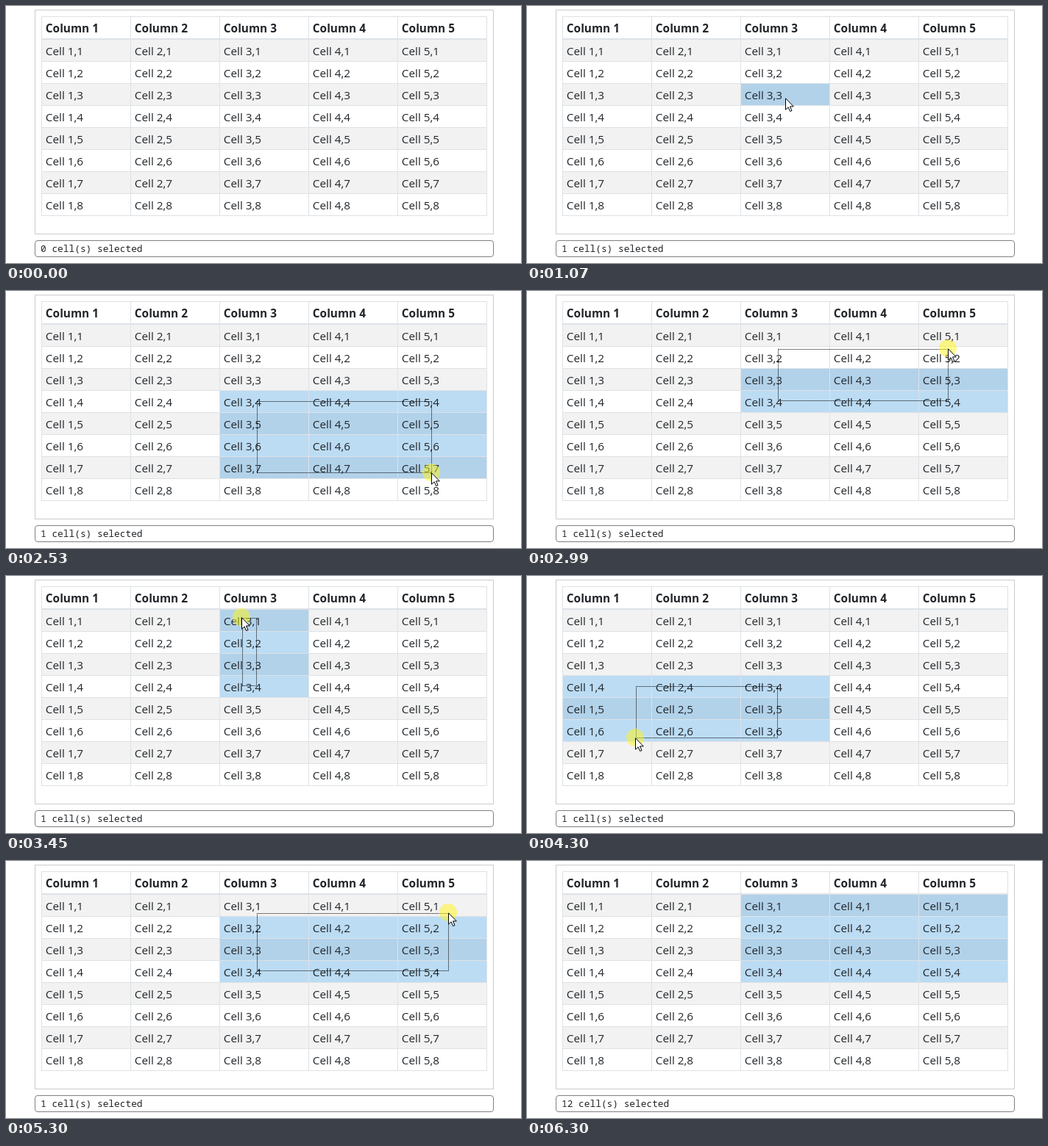
Write an HTML page that moves like this. It is 700 px wide and 350 px high and loops after 6610 ms.

```html
<!DOCTYPE html>
<html lang="en">
<head>
<meta charset="utf-8">
<title>Table cell selection</title>
<style>
  html, body { margin: 0; width: 100%; height: 100%; overflow: hidden; background: #fff; }
  svg { position: absolute; left: 0; top: 0; display: block; }
  text { font: 15.3px "Open Sans", sans-serif; fill: #212529; }
  .head { font-weight: 700; font-size: 15.4px; }
  #status { font: 12.83px "Noto Sans Mono", monospace; white-space: pre; }
  .grid { fill: #dee2e6; }
  .cell { fill: #fff; }
  .cell.odd { fill: #f2f2f2; }
  .cell.on { fill: #bcdcf4; }
  .cell.odd.on { fill: #b2d2ea; }
  #lasso { position: absolute; box-sizing: border-box; border: 1px dotted #000; }
</style>
</head>
<body>
<svg width="700" height="350" viewBox="0 0 700 350">
  <rect x="39.5" y="5.5" width="623" height="305" fill="none" stroke="#ccc"/>
  <rect x="39.5" y="319.5" width="623" height="22" rx="3.5" fill="#fff" stroke="#808080"/>
  <text id="status" x="47" y="335"></text>
  <g id="table"></g>
</svg>
<div id="lasso"></div>
<svg width="700" height="350" viewBox="0 0 700 350">
  <circle id="halo" r="12" fill="#fff614" fill-opacity=".5"/>
  <path id="arrow" d="M.5 .8V16.2L4.1 12.8L6.6 18.5L9 17.5L6.5 11.9H11.3Z" fill="#fff" stroke="#000"/>
</svg>
<script>
const LOOP = 6610, STEP = 76.96;
const COLS = 5, ROWS = 8, COL_W = 121, ROW_H = 30, LEFT = 48, TOP = 46;
const CLICK = 9, PRESS = 20, RELEASE = 75, GONE = 82;
const LAG = 1.1; // steps by which the highlight trails the pointer

// Turning points of the pointer; a repeated place is a rest
const REST = { x: 354, y: 122 }, ANCHOR = { x: 341, y: 150 }, END = { x: 602, y: 62 };
const KEYS = [
  { k: 1, x: 528, y: 304 },
  { k: 7, ...REST }, { k: 13, ...REST },
  { k: 17, ...ANCHOR }, { k: PRESS, ...ANCHOR },
  { k: 26, x: 360, y: 217 },
  { k: 34, x: 600, y: 240 },
  { k: 39, x: 573, y: 79 },
  { k: 45, x: 321, y: 57 },
  { k: 56, x: 148, y: 221 },
  { k: 61, x: 310, y: 264 },
  { k: 65, x: 582, y: 205 },
  { k: 69, x: 602, y: 71 },
  { k: 71, ...END }, { k: 77, ...END },
  { k: 81, x: 580, y: 331 }
];

const $ = id => document.getElementById(id);
const clamp = (v, lo, hi) => Math.min(hi, Math.max(lo, v));
const between = (v, a, b) => v >= Math.min(a, b) && v <= Math.max(a, b);
const show = (el, on) => { el.style.display = on ? "" : "none"; };

function add(tag, attrs, text = "") {
  const el = document.createElementNS("http://www.w3.org/2000/svg", tag);
  for (const name in attrs) el.setAttribute(name, attrs[name]);
  el.textContent = text;
  $("table").append(el);
  return el;
}

const cells = [];
function buildTable() {
  add("rect", { class: "grid", x: LEFT, y: 14, width: COLS * COL_W + 1, height: 272 });
  for (let c = 0; c < COLS; c++) {
    const x = LEFT + 1 + c * COL_W, tx = x + 4.8, width = COL_W - 1;
    add("rect", { class: "cell", x, y: 15, width, height: 29 });
    add("text", { class: "head", x: tx, y: 36 }, `Column ${c + 1}`);
    for (let r = 0; r < ROWS; r++) {
      const y = TOP + r * ROW_H;
      const el = add("rect", { class: r % 2 ? "cell" : "cell odd", x, y, width, height: ROW_H - 1 });
      cells.push({ el, c, r });
      add("text", { x: tx, y: y + 21 }, `Cell ${c + 1},${r + 1}`);
    }
  }
}

const samePlace = (a, b) => a.x === b.x && a.y === b.y;

// Catmull-Rom tangent, zero beside a rest
function tangent(i, axis) {
  const a = KEYS[Math.max(i - 1, 0)], b = KEYS[i], c = KEYS[Math.min(i + 1, KEYS.length - 1)];
  const resting = (a !== b && samePlace(a, b)) || (b !== c && samePlace(b, c));
  return resting ? 0 : (c[axis] - a[axis]) / (c.k - a.k);
}

function pointer(step) {
  const k = clamp(step, KEYS[0].k, KEYS[KEYS.length - 1].k);
  const i = Math.max(KEYS.findIndex(key => key.k >= k) - 1, 0);
  const p = KEYS[i], q = KEYS[i + 1], h = q.k - p.k;
  const u = (k - p.k) / h, v = 1 - u, ease = u * u * (3 - 2 * u);
  const at = axis => Math.round(p[axis] + (q[axis] - p[axis]) * ease
    + h * u * v * (v * tangent(i, axis) - u * tangent(i + 1, axis)));
  return { x: at("x"), y: at("y") };
}

const cellAt = ({ x, y }) => ({
  c: clamp(Math.floor((x - LEFT - .5) / COL_W), 0, COLS - 1),
  r: clamp(Math.floor((y - TOP + .5) / ROW_H), 0, ROWS - 1)
});

function select(step) {
  const dragged = step >= PRESS;
  const from = cellAt(dragged ? ANCHOR : REST);
  const to = dragged ? cellAt(pointer(clamp(step - LAG, PRESS, RELEASE))) : from;
  for (const { el, c, r } of cells)
    el.classList.toggle("on", step >= CLICK && between(c, from.c, to.c) && between(r, from.r, to.r));
}

function drawLasso({ x, y }) {
  Object.assign($("lasso").style, {
    left: Math.min(x, ANCHOR.x) + "px",
    top: Math.min(y, ANCHOR.y) + "px",
    width: Math.abs(x - ANCHOR.x) + "px",
    height: Math.abs(y - ANCHOR.y) + "px"
  });
}

function draw(step) {
  const tip = pointer(step), shift = `translate(${tip.x - 1} ${tip.y - 1})`;
  const dragging = step >= PRESS && step < RELEASE;
  select(step);
  drawLasso(tip);
  show($("lasso"), dragging);
  show($("halo"), dragging || step === CLICK);
  show($("arrow"), step > 0 && step < GONE);
  $("halo").setAttribute("transform", shift);
  $("arrow").setAttribute("transform", shift);
  const count = step <= CLICK ? 0 : step < RELEASE ? 1 : 12;
  $("status").textContent = `${count} cell(s) selected`;
}

let last = -1;
function tick() {
  const t = Math.floor(performance.now() % LOOP / 10) * 10; // delays come in whole 10 ms
  const step = clamp(Math.ceil((t - 60) / STEP), 0, GONE);
  if (step !== last) draw(last = step);
  requestAnimationFrame(tick);
}

buildTable();
tick();
</script>
</body>
</html>
```
